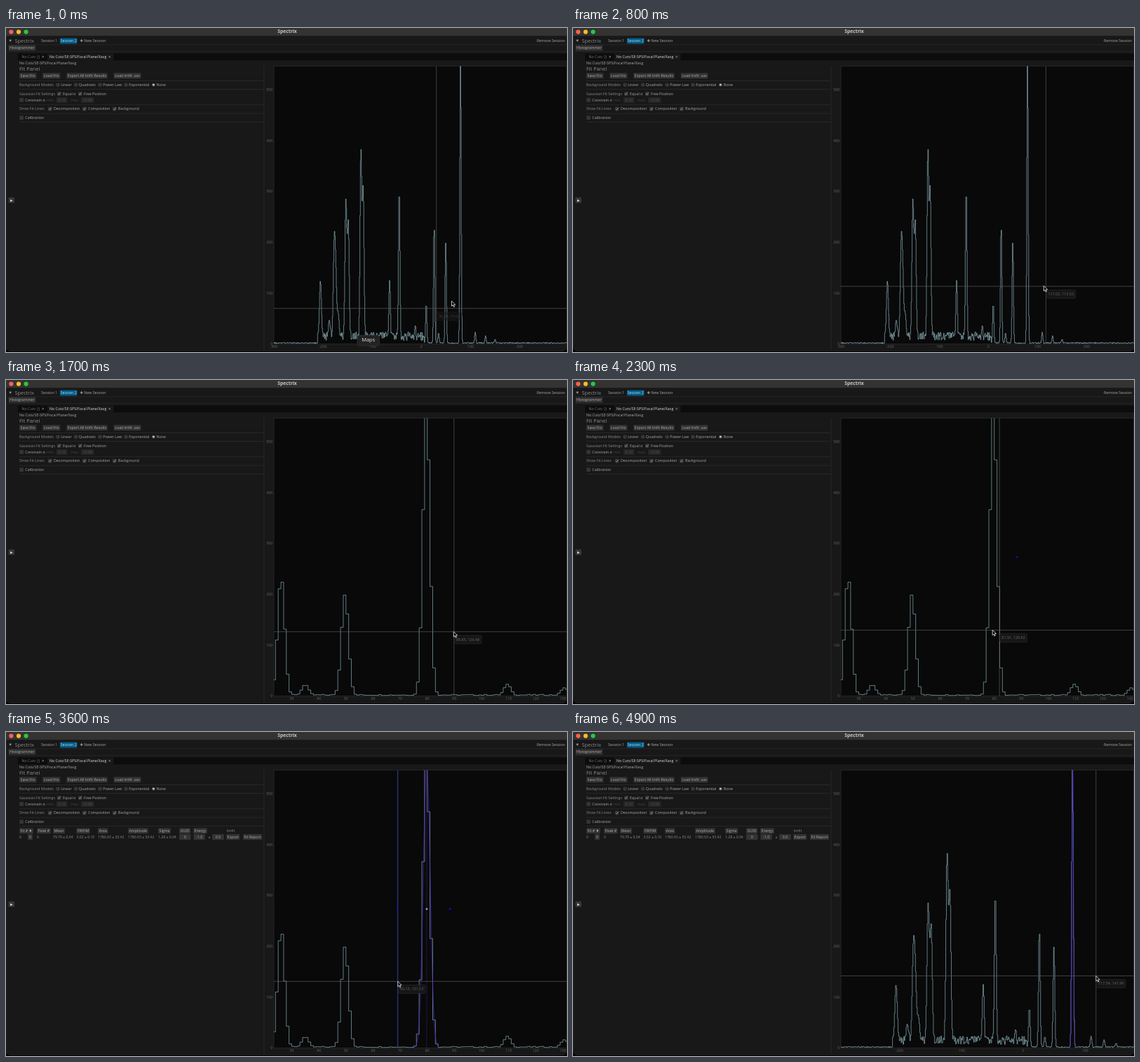
An HTML page with a canvas that plays this animation: 800x463 px, repeating every 5 s.

```html
<!DOCTYPE html>
<html lang="en">
<head>
<meta charset="utf-8">
<title>Spectrum fit</title>
<style>
html, body { margin: 0; width: 100%; height: 100%; overflow: hidden; background: #000; }
canvas { display: block; width: 800px; height: 463px; }
</style>
</head>
<body>
<canvas id="stage" width="800" height="463"></canvas>
<script>
const g = document.getElementById('stage').getContext('2d');
const LOOP = 5000, STEP = 100, LAG = 40;
const FONT = '"Open Sans", "Noto Sans", "DejaVu Sans", sans-serif';
const GREY = '#8c8c8c', LIGHT = '#aaa', RULE = '#2e2e2e', PANEL = '#181818';
const PLOT = { left: 382, top: 54.5, right: 799.5, bottom: 451.5 };
const Y_SCALE = 0.7255;
const FIT = { mean: 79.79, sigma: 1.28, amp: 555 };

// ---- drawing helpers ----
function text(s, x, y, color = GREY, size = 5.3, align = 'left', weight = 400) {
  g.font = `${weight} ${size}px ${FONT}`;
  g.textAlign = align;
  g.textBaseline = 'middle';
  g.fillStyle = color;
  g.fillText(s, x, y + 0.2);
  return g.measureText(s).width;
}
function rect(x, y, w, h, color) {
  g.fillStyle = color;
  g.fillRect(x, y, w, h);
}
function round(x, y, w, h, r, fill, stroke) {
  g.beginPath();
  g.roundRect(x, y, w, h, r);
  g.fillStyle = fill;
  g.fill();
  if (stroke) { g.strokeStyle = stroke; g.lineWidth = 0.6; g.stroke(); }
}
function dot(x, y, r, color) {
  g.beginPath();
  g.arc(x, y, r, 0, 7);
  g.fillStyle = color;
  g.fill();
}
function line(points, color, width = 0.7) {
  g.beginPath();
  points.forEach(([x, y]) => g.lineTo(x, y));
  g.strokeStyle = color;
  g.lineWidth = width;
  g.stroke();
}

// ---- widgets: each returns the x where the next one starts ----
function button(s, x, y, color = LIGHT, bg = '#333', pad = 1.5) {
  g.font = `400 5.3px ${FONT}`;
  const w = g.measureText(s).width + 2 * pad;
  round(x, y - 4, w, 8, 1, bg);
  text(s, x + pad, y, color);
  return x + w + 9;
}
function check(s, x, y, on) {
  round(x, y - 2.8, 5.6, 5.6, 0.8, '#363636');
  if (on) line([[x + 1.2, y], [x + 2.4, y + 1.5], [x + 4.5, y - 1.6]], '#b4b4b4');
  return x + 8 + text(s, x + 8, y, LIGHT) + 3.6;
}
function radio(s, x, y, on) {
  dot(x + 2.8, y, 2.8, '#363636');
  if (on) dot(x + 2.8, y, 1.4, '#c8c8c8');
  return x + 7 + text(s, x + 7, y, LIGHT) + 3.2;
}
const flow = (widget, labels, x, y, isOn = () => true) =>
  labels.reduce((at, s) => widget(s, at, y, isOn(s)), x);

// ---- spectrum: one count per unit bin ----
const rand = i => { const v = Math.sin(i * 12.9898) * 43758.5453; return v - Math.floor(v); };
const bell = (x, mean, h, sigma) => h * Math.exp(-(((x - mean) / sigma) ** 2) / 2);
// Position and height of each line; lines widen towards the left
const peaks = [
  [-205.2, 123], [-187, 45], [-177.3, 180], [-174, 120], [-168.8, 55], [-153.5, 278],
  [-148.5, 235], [-122.9, 376], [-118.2, 298], [-64.5, 123], [-45, 306], [-12.5, 35],
  [10, 80], [26.1, 235], [35, 22], [49.65, 200], [79.7, 562], [109.6, 23], [130.6, 16], [150, 9]
];
const width = x => Math.max(1.3, 1.3 - x / 250);
function count(i) {
  const signal = peaks.reduce((sum, [x, h]) => sum + bell(i + 0.5, x, h, width(x)), 0);
  const noise = (i > -212 && i < 6 ? 17 : 2.2) * (0.4 + rand(i));
  return Math.hypot(signal, noise);
}
const counts = Array.from({ length: 620 }, (_, k) => [k - 310, count(k - 310)]);

// ---- motion ----
const path = [
  [0, 613.746, 400.7], [100, 668, 374], [400, 674.366, 369.134], [800, 674.366, 369.134],
  [1000, 659, 366], [1500, 659, 366], [1700, 638.82, 359.739], [2200, 633, 358],
  [2500, 558.35, 356.365], [2800, 558.35, 356.365], [3600, 558.738, 356.365],
  [4475, 558.738, 356.365], [4500, 586.295, 356.365], [4650, 745.823, 348.486]
];
function mouse(t) {
  const k = path.findLastIndex(p => p[0] <= t);
  const a = path[k], b = path[k + 1] || a;
  const f = a === b ? 0 : (t - a[0]) / (b[0] - a[0]);
  return [a[1] + (b[1] - a[1]) * f, a[2] + (b[2] - a[2]) * f];
}
// Views are [pixels per unit, pixel of zero]; zooming keeps their shared point fixed
const WIDE = [0.7013, 592.3], NEAR = [3.865, 291.55], BACK = [0.8833, 642];
function zoom([s0, o0], [s1, o1], f) {
  const s = s0 * (s1 / s0) ** Math.min(1, Math.max(0, f));
  return [s, o0 + (o1 - o0) * (s - s0) / (s1 - s0)];
}
const view = t => t < 3000 ? zoom(WIDE, NEAR, (t - 1000) / 500) : zoom(NEAR, BACK, (t - 4600) / 300);
const yPx = v => PLOT.bottom - v * Y_SCALE;

// ---- parts ----
function chrome() {
  const crumbs = 'No Cuts/SE-SPS/Focal Plane/Xavg';
  rect(0, 0, 800, 463, '#000');
  round(0, 0, 800, 461.5, [0, 0, 6, 6], PANEL, RULE);
  rect(0, 0, 800, 11.2, '#343332');
  ['#fe5f57', '#febc2e', '#28c840'].forEach((c, i) => dot(7.4 + 10.6 * i, 5.6, 3.1, c));
  text('Spectrix', 401, 5.3, '#c8c8c8', 6.8, 'center', 700);

  text('☀', 3.5, 18.3, '#ccc', 6);
  text('Spectrix', 12.5, 18.5, GREY, 7.4);
  text('Session 1', 50, 18.5, LIGHT);
  round(77, 14.5, 24.5, 8, 1, '#055c86');
  text('Session 2', 89.2, 18.5, '#b8dcf4', 5.3, 'center');
  text('✚ New Session', 105.5, 18.5, LIGHT);
  text('Remove Session', 797, 18.5, LIGHT, 5.3, 'right');
  rect(0, 23.6, 800, 0.6, RULE);
  button('Histogrammer', 3.5, 28.5);
  rect(0, 33.5, 800, 0.6, RULE);

  rect(17, 36.5, 783, 9.7, '#0c0c0c');
  text('No Cuts ◳', 22.5, 41.5, '#777');
  text('✕', 50.5, 41.5, '#999');
  rect(59, 36.5, 94.5, 9.8, PANEL);
  text(crumbs, 62, 41.5, '#ddd');
  text('✕', 145.5, 41.5, '#999');
  text(crumbs, 19, 50, LIGHT);

  round(3.5, 242, 8.5, 8, 1, '#363636');
  text('▶', 7.8, 246, '#ccc', 5, 'center');
}

function fitPanel() {
  const dim = ['#555', '#262626', 2.5];
  text('Fit Panel', 19, 59, GREY, 7.4);
  flow((s, x, y) => button(s, x, y), ['Save Fits', 'Load Fits', 'Export All lmfit Results', 'Load lmfit .sav'], 19, 68.3);
  text('Background Models', 19, 81.2);
  flow(radio, ['Linear', 'Quadratic', 'Power Law', 'Exponential', 'None'], 71.2, 81.2, s => s === 'None');
  text('Gaussian Fit Settings', 19, 94);
  flow(check, ['Equal σ', 'Free Position'], 73, 94);
  check('Constrain σ', 19.3, 103, false);
  text('min:', 58, 103, '#444');
  button('0.10', 72, 103, ...dim);
  text('max:', 92, 103, '#444');
  button('10.00', 107, 103, ...dim);
  text('Show Fit Lines:', 19, 115.6);
  flow(check, ['Decomposition', 'Composition', 'Background'], 60, 115.6);
  check('Calibration', 19.3, 128.2, false);
  for (const y of [75, 87.3, 109.4, 121.8, 134.3]) rect(19, y, 348, 0.7, RULE);
  rect(367.6, 54, 0.7, 406, RULE);
}

const columns = [
  [19, 'Fit # ♦', '0'], [44, 'Peak #', '0'], [67, 'Mean', '79.79 ± 0.04'],
  [100.5, 'FWHM', '3.02 ± 0.10'], [131, 'Area', '1780.93 ± 53.42'],
  [174, 'Amplitude', '1780.93 ± 53.42'], [217, 'Sigma', '1.28 ± 0.04']
];
function fitTable() {
  const head = 141.2, row = 150;
  for (const [x, title, value] of columns) {
    button(title, x, head);
    text(value, x, row, GREY, 5.1);
  }
  button('X', 31, row, LIGHT, '#333', 2);
  button('UUID', 247, head);
  button('0', 247, row, LIGHT, '#333', 6.7);
  button('Energy', 267, head);
  button('-1.0', 267.5, row, LIGHT, '#333', 3.5);
  text('±', 288.5, row);
  button('0.0', 294, row, LIGHT, '#333', 4.7);
  text('lmfit', 315, head);
  button('Export', 314, row);
  button('Fit Report', 338, row);
}

function markers(t, xPx) {
  const { top, bottom } = PLOT, mid = (top + bottom) / 2;
  const mark = (v, dotColor, lineColor) => {
    const x = xPx(v);
    if (lineColor) line([[x, top], [x, bottom]], lineColor, 1);
    dot(x, mid, 1.4, dotColor);
  };
  if (t >= 2200) mark(88.34, '#0c0cd8');
  if (t >= 2600) mark(69.03, '#0c0cd8', 'rgba(20, 60, 190, .7)');
  if (t >= 3200) mark(FIT.mean, '#b48ad8', 'rgba(90, 40, 140, .4)');
}

function plot(t) {
  const { left, top, right, bottom } = PLOT;
  const [scale, origin] = view(t);
  const xPx = v => origin + v * scale;
  const [cx, cy] = mouse(t);

  rect(left, top, right - left, bottom - top, '#090909');
  g.strokeStyle = RULE;
  g.lineWidth = 0.7;
  g.strokeRect(left, top, right - left, bottom - top);
  for (let v = 0; v <= 500; v += 100) text(v, 380.3, yPx(v), '#666', 5.3, 'right');
  const tick = scale > 2.5 ? 10 : 100;
  for (let v = -300; v <= 300; v += tick) {
    const x = xPx(v);
    if (x > left - 2 && x < 797) text(v, x, 455, '#666', 5.3, 'center');
  }

  g.save();
  g.beginPath();
  g.rect(left, top, right - left, bottom - top + 0.5);
  g.clip();
  line(counts.flatMap(([i, n]) => [[xPx(i), yPx(n)], [xPx(i + 1), yPx(n)]]), '#a0cad6', 0.6);
  if (t >= 3200) {
    const curve = [];
    for (let d = -4; d <= 4; d += 0.1) {
      const x = FIT.mean + d * FIT.sigma;
      curve.push([xPx(x), yPx(bell(x, FIT.mean, FIT.amp, FIT.sigma))]);
    }
    line(curve, 'rgba(128, 40, 160, .6)', 0.6);
    line(curve, 'rgba(40, 40, 255, .7)', 0.6);
  }
  line([[left, cy], [right, cy]], '#5a5a5a');
  line([[cx, top], [cx, bottom]], '#5a5a5a');
  if (t < 3900) markers(t, xPx);
  g.restore();

  const label = `${((cx - origin) / scale).toFixed(2)}, ${((bottom - cy) / Y_SCALE).toFixed(2)}`;
  g.globalAlpha = t < 100 ? 0.5 : 0.9;
  g.font = `400 5.4px ${FONT}`;
  round(cx + 0.5, cy + 5.2, g.measureText(label).width + 5.5, 12, 2, PANEL, '#303030');
  text(label, cx + 3.2, cy + 11.3, '#707070', 5.4);
  g.globalAlpha = 1;
}

function arrow(x, y) {
  g.beginPath();
  [[0, 0], [0, 7.4], [1.7, 5.8], [2.9, 8.6], [4.1, 8.1], [3, 5.4], [5.3, 5.3]]
    .forEach(([dx, dy]) => g.lineTo(x + dx, y + dy));
  g.closePath();
  g.fillStyle = '#000';
  g.fill();
  g.strokeStyle = '#eee';
  g.lineWidth = 0.8;
  g.stroke();
}

function draw(now) {
  const t = Math.floor(now % LOOP / STEP) * STEP;
  chrome();
  fitPanel();
  if (t >= 3200) fitTable();
  plot(t);
  if (t < 300) {
    g.globalAlpha = 1 - t / 300;
    round(501, 439, 31.5, 15, 3, '#222', '#383838');
    text('Maps', 516.7, 446.3, '#ddd', 7.5, 'center');
    g.globalAlpha = 1;
  }
  arrow(...mouse(t + LAG));
  requestAnimationFrame(draw);
}
requestAnimationFrame(draw);
</script>
</body>
</html>
```
